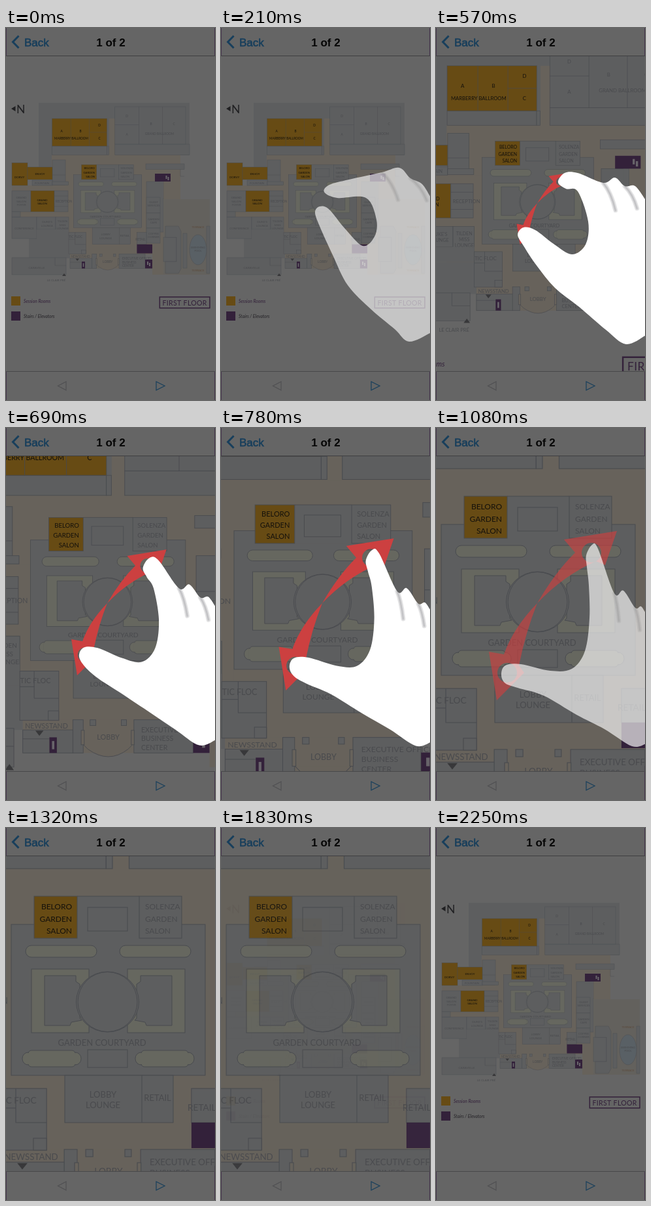
Recreate the animation shown at these times as an HTML page with a canvas. Size 320 px wide and 567 px high, loop 2.28 s.

```html
<!DOCTYPE html>
<html lang="en">
<head>
<meta charset="utf-8">
<title>Pinch to zoom</title>
<style>
html, body { margin: 0; width: 100%; height: 100%; overflow: hidden; background: #656565; }
canvas { display: block; width: 320px; height: 567px; }
</style>
</head>
<body>
<canvas id="stage"></canvas>
<script>
const W = 320, H = 567, LOOP = 2280, STEP = 30;
const CX = 155, CY = 265, ZOOM = 2.84;
const PAGE = '#656565', WALL = '#5d5e5f', HALL = '#67625b', LAWN = '#66675f';
const LINE = '#494b4f', FAINT = '#4a4b4e', DARK = '#14110c';
const GOLD = '#674b14', PURPLE = '#33213a', BLUE = '#183f5c';
const MAP_FONT = 'Lato, "Open Sans", sans-serif';
const UI_FONT = '"Liberation Sans", Arial, sans-serif';

const stage = document.getElementById('stage');
const layer = document.createElement('canvas');
const dpr = window.devicePixelRatio || 1;
for (const c of [stage, layer]) { c.width = W * dpr; c.height = H * dpr; }
const view = stage.getContext('2d');
let g = layer.getContext('2d');

const clamp = v => Math.max(0, Math.min(1, v));
const mix = (a, b, u) => a + (b - a) * u;
const ease = u => u < 0.5 ? 2 * u * u : 1 - 2 * (1 - u) * (1 - u);

function box(x, y, x2, y2, fill = WALL, stroke = LINE) {
  if (fill) { g.fillStyle = fill; g.fillRect(x, y, x2 - x, y2 - y); }
  if (stroke) { g.strokeStyle = stroke; g.strokeRect(x, y, x2 - x, y2 - y); }
}
function poly(pts, fill, stroke, close = true) {
  g.beginPath();
  for (let i = 0; i < pts.length; i += 2) g.lineTo(pts[i], pts[i + 1]);
  if (close) g.closePath();
  if (fill) { g.fillStyle = fill; g.fill(); }
  if (stroke) { g.strokeStyle = stroke; g.stroke(); }
}
const line = (...pts) => poly(pts, null, LINE, false);
function pill(x, y, x2, y2, r) {
  g.beginPath();
  g.roundRect(x, y, x2 - x, y2 - y, r);
  g.fillStyle = LAWN; g.fill();
  g.strokeStyle = LINE; g.stroke();
}
function oval(x, y, rx, ry, fill) {
  g.beginPath();
  g.ellipse(x, y, rx, ry, 0, 0, 7);
  g.fillStyle = fill; g.fill();
  g.strokeStyle = LINE; g.stroke();
}
// Lines of text separated by "|"
function label(str, x, y, size, color = FAINT, align = 'center', lead = size * 1.25, style = '') {
  g.font = `${style} ${size}px ${MAP_FONT}`;
  g.fillStyle = color;
  g.textAlign = align;
  str.split('|').forEach((s, i) => g.fillText(s, x, y + i * lead));
}
function stairs(x, y, x2, y2, ix, iy) {
  box(x, y, x2, y2, PURPLE, null);
  box(ix, iy, ix + 2, iy + 5, '#68646a', null);
  box(ix + 3, iy + 2, ix + 5, iy + 7, '#68646a', null);
}

// Outer rooms, in units of the whole plan
function plan() {
  g.lineWidth = 0.4;
  box(50, 114, 281, 194, WALL, null);
  box(50, 194, 91, 212, WALL, null);
  box(70, 193, 267, 345, HALL, null);
  box(9, 240, 103, 311, HALL, null);
  box(35, 321, 98, 351, WALL, null);
  box(98, 344, 213, 366.5, HALL, null);
  box(158, 138, 167, 194, HALL, null);
  box(224, 234, 241, 376, HALL, null);

  box(70.5, 180, 154.4, 193.5);
  box(154.4, 180, 157.8, 193.5);
  box(70.5, 138, 154.5, 180, GOLD);
  line(99.3, 138, 99.3, 180);
  line(127.5, 138, 127.5, 180);
  line(127.5, 159, 154.5, 159);
  label('A', 85, 158.5, 4.8, DARK);
  label('B', 114, 158.5, 4.8, DARK);
  label('D', 143, 149.5, 4.8, DARK);
  label('C', 143, 170, 4.8, DARK);
  label('MARBERRY BALLROOM', 100, 170, 4.7, DARK);

  box(166.8, 177, 281, 193.5);
  box(166.8, 120, 275, 177);
  line(203.5, 120, 203.5, 177);
  line(239.5, 120, 239.5, 177);
  line(166.8, 147.5, 203.5, 147.5);
  label('D', 185, 136, 4.8);
  label('A', 185, 164, 4.8);
  label('B', 222, 148, 4.8);
  label('C', 257, 148, 4.8);
  label('GRAND BALLROOM', 235, 162.5, 4.8);

  box(71, 201, 91, 239);
  line(71, 224, 91, 224);
  box(40, 232, 71, 240);
  box(71, 234, 95.5, 239.5);
  label('FOUNTAIN', 55, 238, 4.4);
  box(9, 205.5, 33, 240, GOLD);
  box(33, 212, 71, 231, GOLD);
  label('DORVY', 20.5, 229, 4.4, DARK);
  label('ENVOY', 52, 224, 4.4, DARK);

  box(9, 248, 38, 280);
  label('GRAND|SALON|FOYER', 23.5, 260, 4.5);
  box(38, 248, 74, 280, GOLD);
  label('GRAND|SALON', 55.5, 263.5, 4.5, DARK);
  box(74, 248, 95, 280);
  line(74, 256, 95, 256);
  line(74, 272, 95, 272);
  label('RECEPTION', 88.6, 266, 4.7);

  box(9, 288, 47, 321);
  box(9, 280, 22, 288);
  label('CONFERENCE', 28, 307, 4.5);
  box(47, 288, 76, 307);
  label("DUKE'S|LOUNGE", 63, 297, 4.5);
  box(76, 288, 96, 311);
  label('TILDEN|MISS|LOUNGE', 86.5, 296, 4.4);
  box(47, 307, 96, 321, WALL, null);

  box(96, 311.5, 122.3, 344.6);
  line(105.7, 311.5, 105.7, 329.8, 122.3, 329.8);
  line(96, 322, 105.7, 322);
  box(115.2, 338.2, 122.3, 344.6);
  label('TIC FLOC', 106.5, 319.5, 4.8);

  box(9, 350, 92, 376);
  line(75, 350, 75, 362, 92, 362);
  label('CARAVELLE', 47, 366.5, 4.6);
  poly([86, 378, 92, 378, 89, 374], '#38383a');
  label('LE CLAIR PRÉ', 77, 386, 4.6);
  box(98, 351, 132, 366.5);
  line(98, 357, 116, 357);
  label('NEWSSTAND', 114, 350, 4.7);
  poly([106.5, 351.5, 112, 351.5, 109.2, 355], '#38383a');
  box(116, 356, 121, 366.5, PURPLE, null);
  box(117.7, 358.5, 119.3, 364, '#68646a', null);

  // Lobby and its columns
  g.beginPath();
  g.moveTo(139, 361);
  g.lineTo(142, 364);
  g.quadraticCurveTo(156, 374, 169, 364);
  g.lineTo(172, 361);
  g.fillStyle = HALL; g.fill();
  g.strokeStyle = LINE; g.stroke();
  box(131.8, 344.2, 138.8, 366.5);
  box(137.4, 351.3, 139.5, 361, HALL);
  box(173, 344.2, 213, 366.5);
  box(171.2, 351.3, 173.2, 361, HALL);
  box(143.4, 344.2, 147.3, 348.1);
  box(164.5, 344.2, 168, 348.1);
  label('LOBBY', 155.7, 357.5, 4.8);
  label('EXECUTIVE OFFICES|BUSINESS|CENTER', 177.9, 352.7, 4.7, FAINT, 'left');

  // East wing
  box(214, 207, 273, 215.5);
  line(267, 215.5, 267, 226, 273, 226);
  box(215, 234, 241, 311);
  box(236, 234, 241, 259, WALL, null);
  box(215, 258, 236, 282);
  box(215, 282, 236, 305);
  box(215, 305, 236, 328);
  label('GUEST|SERVICES', 226, 267, 4.3);
  label('GARDEN|CAFE', 226, 293, 4.3);
  label('COFFEE|CORNER', 226, 315, 4.3);
  box(200.4, 311.5, 215, 329.8);
  label('RETAIL', 206, 323.5, 4.8);
  box(200.4, 329.8, 224, 343.5, PURPLE, null);
  stairs(228, 222, 252, 234, 244.5, 225);
  stairs(213, 353, 224, 366.5, 216, 356);

  // Pool
  box(241, 261, 312, 376, '#63615d', null);
  box(241, 319, 261, 356);
  poly([244, 302, 264, 302, 268, 310, 268, 367, 264, 374, 244, 374, 244, 356, 261, 356, 261, 319, 244, 319], WALL, LINE);
  box(271, 313, 277, 366);
  box(307, 302, 312, 374);
  oval(294, 338, 13, 23, '#596065');
  label('SWIMMING|POOL', 294, 336, 4.1);
  label('TERRACE', 294, 305, 4.4, '#5c4a3c');
  label('TERRACE', 294, 371, 4.4, '#5c4a3c');

  // Legend
  poly([8, 123, 14.5, 119, 14.5, 127], '#202022');
  label('N', 16, 130, 17.5, '#202022', 'left');
  box(8, 409, 22, 423, GOLD, null);
  box(8, 432, 22, 446, PURPLE, null);
  label('Session Rooms', 27, 419, 6.8, PURPLE, 'left', 8, 'italic');
  label('Stairs / Elevators', 27, 442, 6.8, '#262428', 'left', 8, 'italic');
  g.lineWidth = 1.5;
  box(235.3, 410, 312, 426.8, null, PURPLE);
  g.letterSpacing = '0.3px';
  label('FIRST FLOOR', 239.5, 422.6, 10.6, PURPLE, 'left');
  g.letterSpacing = '0px';
}

// Centre of the building, in units of the fully zoomed plan
function courtyard() {
  g.lineWidth = 1;
  box(8, 147, 305, 377);
  box(43, 104, 269, 168, WALL, null);
  line(109, 104, 204, 104);
  box(43, 104, 109, 168, GOLD);
  box(204, 104, 269, 168);
  box(125, 121, 186, 157);
  label('BELORO|GARDEN|SALON', 101, 124, 12, DARK, 'right', 18.5);
  label('SOLENZA|GARDEN|SALON', 213, 124, 12, FAINT, 'left', 18.5);
  pill(30, 179, 139, 197, 9);
  pill(174, 179, 283, 197, 9);
  const wing = [59, 225, 107, 225, 107, 234, 113, 238, 113, 290, 116, 293, 100, 296, 98, 301, 59, 301];
  for (const flip of [false, true]) {
    g.save();
    if (flip) { g.translate(313, 0); g.scale(-1, 1); }
    box(39, 215, 127, 312, LAWN);
    poly(wing, WALL, LINE);
    pill(25, 342, 115, 361, 9);
    pill(34, 339, 106, 364, 5);
    box(33, 343, 107, 360, LAWN, null);
    g.restore();
  }
  oval(155.5, 265, 48, 46, WALL);
  g.beginPath(); g.arc(155.5, 265, 45.5, 0, 7); g.stroke();
  box(125, 338, 186, 365);
  label('GARDEN COURTYARD', 147, 332, 13);
  box(90, 377, 256, 449);
  line(208, 377, 208, 449);
  label('LOBBY|LOUNGE', 148.5, 411, 13, FAINT, 'center', 16);
  label('RETAIL', 232, 416, 13);
}

function drawMap(scale, alpha) {
  g = layer.getContext('2d');
  g.setTransform(dpr, 0, 0, dpr, 0, 0);
  box(0, 0, W, H, PAGE, null);
  for (const [part, k] of [[plan, scale], [courtyard, scale / ZOOM]]) {
    g.save();
    g.translate(CX, CY);
    g.scale(k, k);
    g.translate(-CX, -CY);
    part();
    g.restore();
  }
  view.globalAlpha = alpha;
  view.drawImage(layer, 0, 0, W, H);
  view.globalAlpha = 1;
}

// Hand outlines from the wrist, around the thumb and index finger, to the knuckles
const pinched = [322,464, 288,478, 266,459, 230,429, 194,392, 171,346, 151,302, 144,281, 151,272, 165,276, 190,306, 217,332,
  235,318, 238,292, 222,259, 178,259, 158,250, 166,239, 196,231, 246,220, 273,213, 290,229, 308,238, 322,260];
const half = [322,468, 291,482, 260,460, 219,425, 182,396, 154,362, 134,332, 125,315, 134,304, 152,308, 180,329, 208,345,
  229,330, 233,295, 217,249, 199,245, 187,235, 197,221, 217,221, 256,236, 274,228, 289,241, 305,241, 322,264];
const spread = [322,481, 300,485, 258,459, 215,437, 165,408, 125,396, 106,389, 100,376, 106,362, 130,360, 175,370, 208,367,
  228,340, 235,290, 234,240, 231,212, 230,194, 239,178, 248,184, 273,252, 287,248, 305,274, 314,272, 322,284];
const HALF_AT = 0.345;

function pose(p) {
  const late = p > HALF_AT;
  const a = late ? half : pinched, b = late ? spread : half;
  const u = late ? (p - HALF_AT) / (1 - HALF_AT) : p / HALF_AT;
  const pts = [];
  for (let i = 0; i < a.length; i += 2) pts.push([mix(a[i], b[i], u), mix(a[i + 1], b[i + 1], u)]);
  return pts;
}

function drawHand(p) {
  const q = pose(p), at = i => q[Math.max(0, Math.min(q.length - 1, i))];
  g.save();
  g.beginPath();
  g.moveTo(...q[0]);
  for (let i = 0; i < q.length - 1; i++) {
    const [a, b, c, d] = [at(i - 1), at(i), at(i + 1), at(i + 2)];
    g.bezierCurveTo(b[0] + (c[0] - a[0]) / 6, b[1] + (c[1] - a[1]) / 6,
      c[0] - (d[0] - b[0]) / 6, c[1] - (d[1] - b[1]) / 6, c[0], c[1]);
  }
  g.closePath();
  g.fillStyle = '#fff';
  g.fill();
  g.clip();
  // Soft creases between the fingers
  g.lineCap = 'round';
  for (const [i, len] of [[19, 42], [21, 34]]) {
    const [x, y] = q[i], dx = mix(25, 7, p);
    g.beginPath();
    g.moveTo(x, y);
    g.quadraticCurveTo(x + dx * 0.65, y + len * 0.35, x + dx, y + len);
    for (const width of [7, 4, 1.5]) {
      g.lineWidth = width;
      g.strokeStyle = 'rgba(110, 110, 114, 0.17)';
      g.stroke();
    }
  }
  g.restore();
}

function drawArrows(p) {
  const k = Math.pow(p, 0.8);
  if (!k) return;
  g.save();
  g.translate(155, 267);
  g.scale(k, k);
  g.fillStyle = '#cc4040';
  g.beginPath();
  g.moveTo(0, 0);
  g.quadraticCurveTo(28, -48, 58, -77);
  g.lineTo(41, -97); g.lineTo(122, -110); g.lineTo(104, -58); g.lineTo(90, -64);
  g.quadraticCurveTo(40, -42, 0, 0);
  g.moveTo(98, -77);
  g.arc(83, -77, 15, 0, Math.PI * 2);
  g.moveTo(0, 0);
  g.quadraticCurveTo(-37, 38, -51, 78);
  g.lineTo(-74, 74); g.lineTo(-62, 148); g.lineTo(-20, 106); g.lineTo(-28, 95);
  g.quadraticCurveTo(-18, 45, 0, 0);
  g.moveTo(-31, 106);
  g.arc(-46, 106, 15, 0, Math.PI * 2);
  g.fill('evenodd');
  g.restore();
}

function drawBars() {
  box(0, 0, W, 42, PAGE, null);
  box(0, 42, W, 43, '#3f3f41', null);
  box(0, 523, W, H, PAGE, null);
  box(0, 523, W, 524, '#48484a', null);
  for (const x of [0, W - 1]) {
    box(x, 0, x + 1, 42, '#43344a', null);
    box(x, 524, x + 1, H, '#43344a', null);
  }
  g.lineCap = 'butt';
  g.lineWidth = 3;
  poly([19.5, 12, 10.5, 21.3, 19.5, 30.5], null, BLUE, false);
  g.font = '17px ' + UI_FONT;
  g.textAlign = 'left';
  g.fillStyle = g.strokeStyle = BLUE;
  g.fillText('Back', 28, 28);
  g.lineWidth = 0.6;
  g.strokeText('Back', 28, 28);
  g.font = 'bold 17px ' + UI_FONT;
  g.textAlign = 'center';
  g.fillStyle = '#050505';
  g.fillText('1 of 2', 160.5, 28);
  g.lineWidth = 1.2;
  poly([92, 539, 79.5, 545.5, 92, 552], null, '#505052');
  poly([230, 539, 243, 545.5, 230, 552], null, BLUE);
}

function draw(t) {
  const p = ease(clamp((t - 310) / 627));
  view.setTransform(dpr, 0, 0, dpr, 0, 0);
  drawMap(mix(1, ZOOM, p), 1);
  const back = clamp((t - 1800) / 450);
  if (back) drawMap(1, back);
  g = view;
  const shown = Math.min(clamp(t / 335), clamp((1320 - t) / 370));
  if (shown) {
    g.globalAlpha = shown;
    drawArrows(p);
    drawHand(p);
    g.globalAlpha = 1;
  }
  drawBars();
}

const start = performance.now();
function tick() {
  const t = (performance.now() - start) % LOOP;
  draw(Math.floor(t / STEP) * STEP);
  requestAnimationFrame(tick);
}
tick();
</script>
</body>
</html>
```
